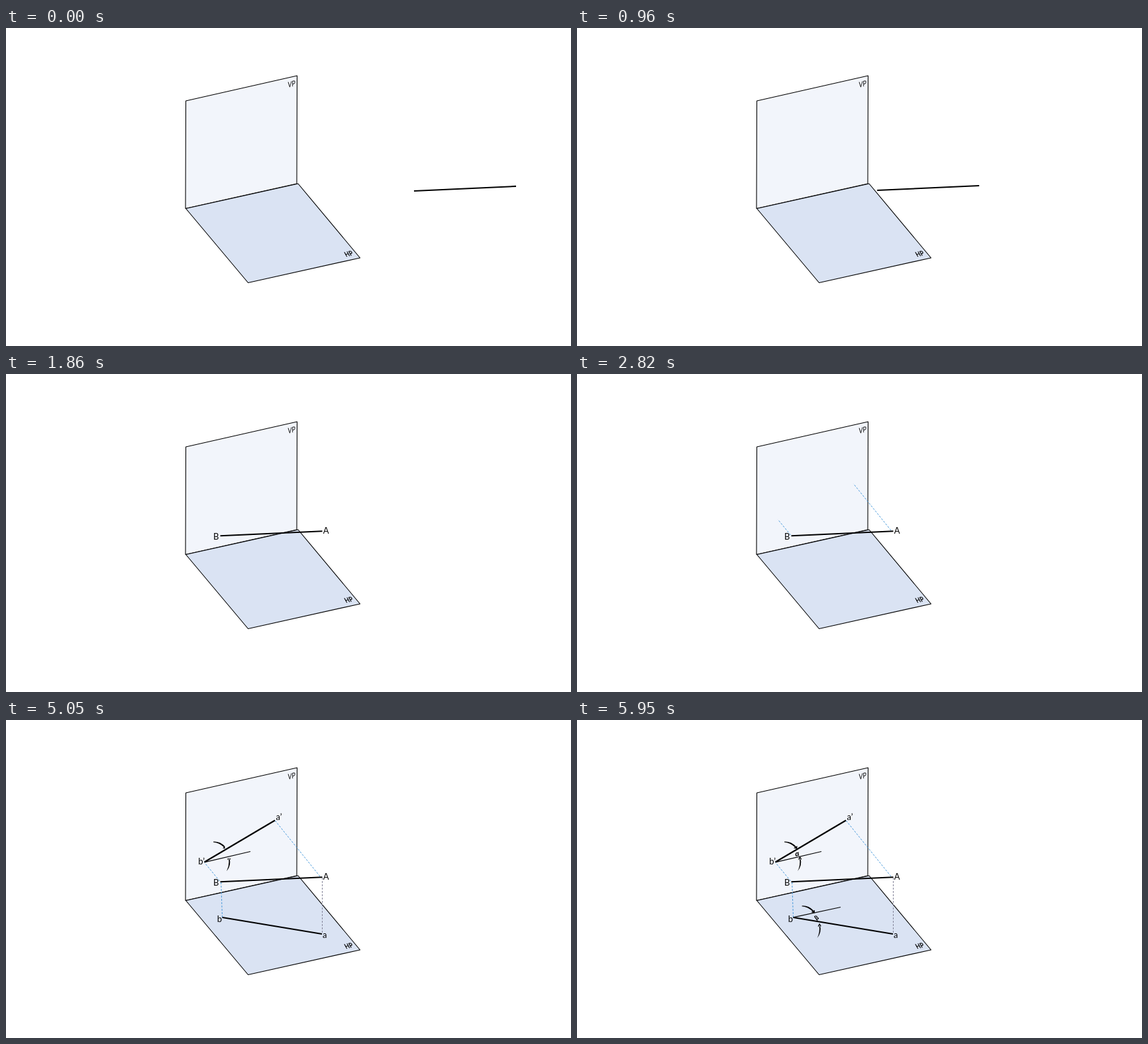
An HTML page for the animation above (6010 ms loop, 853x480 px).

```html
<!DOCTYPE html>
<html lang="en">
<head>
<meta charset="utf-8">
<title>Projection of a line</title>
<style>
  html, body { margin: 0; width: 100%; height: 100%; overflow: hidden; background: #fff; }
  svg { display: block; width: 100vw; height: 100vh; }
  text { font: 13px Lato, "Open Sans", sans-serif; fill: #000; }
  .plane { stroke: #000; stroke-width: 1.1; stroke-linejoin: round; }
  .bold { stroke: #000; stroke-width: 2.1; }
  .thin { stroke: #000; stroke-width: 1.2; }
  .dash { stroke: #4a9bdc; stroke-width: 1; stroke-dasharray: 3 2; }
  .grey { stroke: #85859a; }
  .tag { font-size: 12px; }
  .heavy { font-weight: 700; }
  .angle { font: 600 10px "Noto Sans", "DejaVu Sans", sans-serif; }
</style>
</head>
<body>
<svg viewBox="0 0 853 480" preserveAspectRatio="none">
  <defs>
    <clipPath id="clipOver"><rect id="wipeOver" x="312" y="180" width="0" height="18"/></clipPath>
    <clipPath id="clipUnder"><rect id="wipeUnder" x="330" y="229" width="13" height="0"/></clipPath>
    <clipPath id="clipOver2"><rect id="wipeOver2" x="312" y="180" width="0" height="18"/></clipPath>
    <clipPath id="clipUnder2"><rect id="wipeUnder2" x="330" y="229" width="13" height="0"/></clipPath>
    <path id="over" d="M313 183.6Q323 183 330.8 191L329.3 192.3Q322 185 313 184.4ZM327 193.2L332.6 190L332.2 194.8Z"/>
    <path id="under" d="M333 228.3Q340.4 219 337.4 209L336 209.3Q337.8 219 333 228.3ZM336.6 205.8L339.4 210.2L334 210.6Z"/>
  </defs>

  <path class="plane" fill="#f2f5fb" d="M271.5 110L439.5 72L439 235L271 272.5Z"/>
  <path class="plane" fill="#dae3f3" d="M271.5 272.5L441 235L534.5 347L365.5 384.5Z"/>
  <text class="tag" transform="matrix(.74 -.17 0 .98 425.5 90)">VP</text>
  <text class="tag heavy" transform="matrix(.7 -.16 .45 .8 513.5 345.5)">HP</text>

  <line id="ray1" class="dash"/>
  <line id="ray2" class="dash"/>
  <line id="drop1" class="dash grey"/>
  <line id="drop2" class="dash"/>
  <line id="rod" class="bold" x1="616" y1="246" x2="770" y2="238.9"/>

  <g id="ends">
    <text x="478.8" y="241.3">A</text>
    <text x="313" y="250.3">B</text>
  </g>
  <g id="front">
    <line class="bold" x1="299.5" y1="214.5" x2="406" y2="151.5"/>
    <text x="407.5" y="151">a’</text>
    <text x="290.3" y="218">b’</text>
  </g>
  <g id="top">
    <line class="bold" x1="326.5" y1="298" x2="477" y2="323"/>
    <text x="478" y="328.6">a</text>
    <text x="318.7" y="305">b</text>
  </g>

  <line id="base1" class="thin"/>
  <line id="base2" class="thin"/>
  <g clip-path="url(#clipOver)"><use href="#over"/></g>
  <g clip-path="url(#clipUnder)"><use href="#under"/></g>
  <text id="alpha" class="angle" transform="matrix(.95 -.21 0 1 329.2 206)">α</text>
  <g transform="translate(26.5 96.8)">
    <g clip-path="url(#clipOver2)"><use href="#over"/></g>
  </g>
  <g transform="translate(29.5 101)">
    <g clip-path="url(#clipUnder2)"><use href="#under"/></g>
  </g>
  <text id="beta" class="angle heavy" transform="matrix(.85 -.2 .5 .7 360.4 301.6)">β</text>
</svg>
<script>
const LOOP = 6010, STEP = 60;
const RAMP = .38; // share of the move spent speeding up, and again slowing down
const $ = id => document.getElementById(id);
const set = (id, attrs) => {
  for (const k in attrs) $(id).setAttribute(k, attrs[k]);
};
const part = (t, from, to) => Math.min(1, Math.max(0, (t - from) / (to - from)));

// Steady acceleration, constant speed, steady braking.
function glide(u) {
  if (u > .5) return 1 - glide(1 - u);
  return (u < RAMP ? u * u / (2 * RAMP) : u - RAMP / 2) / (1 - RAMP);
}

// The clock ticks every 60 ms, with one longer hold at 4560 ms.
function tick(t) {
  if (t < 4620) return Math.floor(t / STEP) * STEP;
  if (t < 4690) return 4560;
  return 4690 + Math.floor((t - 4690) / STEP) * STEP;
}

function grow(id, p, x1, y1, x2, y2) {
  set(id, {
    x1, y1, x2: x1 + (x2 - x1) * p, y2: y1 + (y2 - y1) * p,
    visibility: p > 0 ? "visible" : "hidden"
  });
}

function arrows(suffix, p) {
  set("wipeOver" + suffix, { width: 22 * p });
  set("wipeUnder" + suffix, { y: 229 - 24 * p, height: 24 * p });
}

function draw(t) {
  const move = glide(part(t, 130, 1681));
  set("rod", { transform: `translate(${-292.5 * move} ${-1.7 * move})` });
  set("ends", { opacity: part(t, 1680, 1830) });

  const ray = part(t, 1980, 2990);
  grow("ray1", ray, 474, 236, 406, 151.5);
  grow("ray2", ray, 322.5, 243, 299.5, 215);
  set("front", { opacity: part(t, 2990, 3230) });

  const drop = part(t, 3270, 4310);
  grow("drop1", drop, 477.5, 238, 477.5, 323);
  grow("drop2", drop, 324.7, 245, 326.5, 298);
  set("top", { opacity: part(t, 4300, 4440) });

  grow("base1", part(t, 4400, 4560), 300, 214.7, 369, 198.5);
  arrows("", part(t, 4630, 5130));
  set("alpha", { opacity: part(t, 5120, 5220) });

  grow("base2", part(t, 5170, 5290), 326.5, 297.8, 398, 282.5);
  arrows("2", part(t, 5300, 5800));
  set("beta", { opacity: part(t, 5800, 5920) });
}

const start = performance.now();
function frame() {
  draw(tick((performance.now() - start) % LOOP));
  requestAnimationFrame(frame);
}
frame();
</script>
</body>
</html>
```
